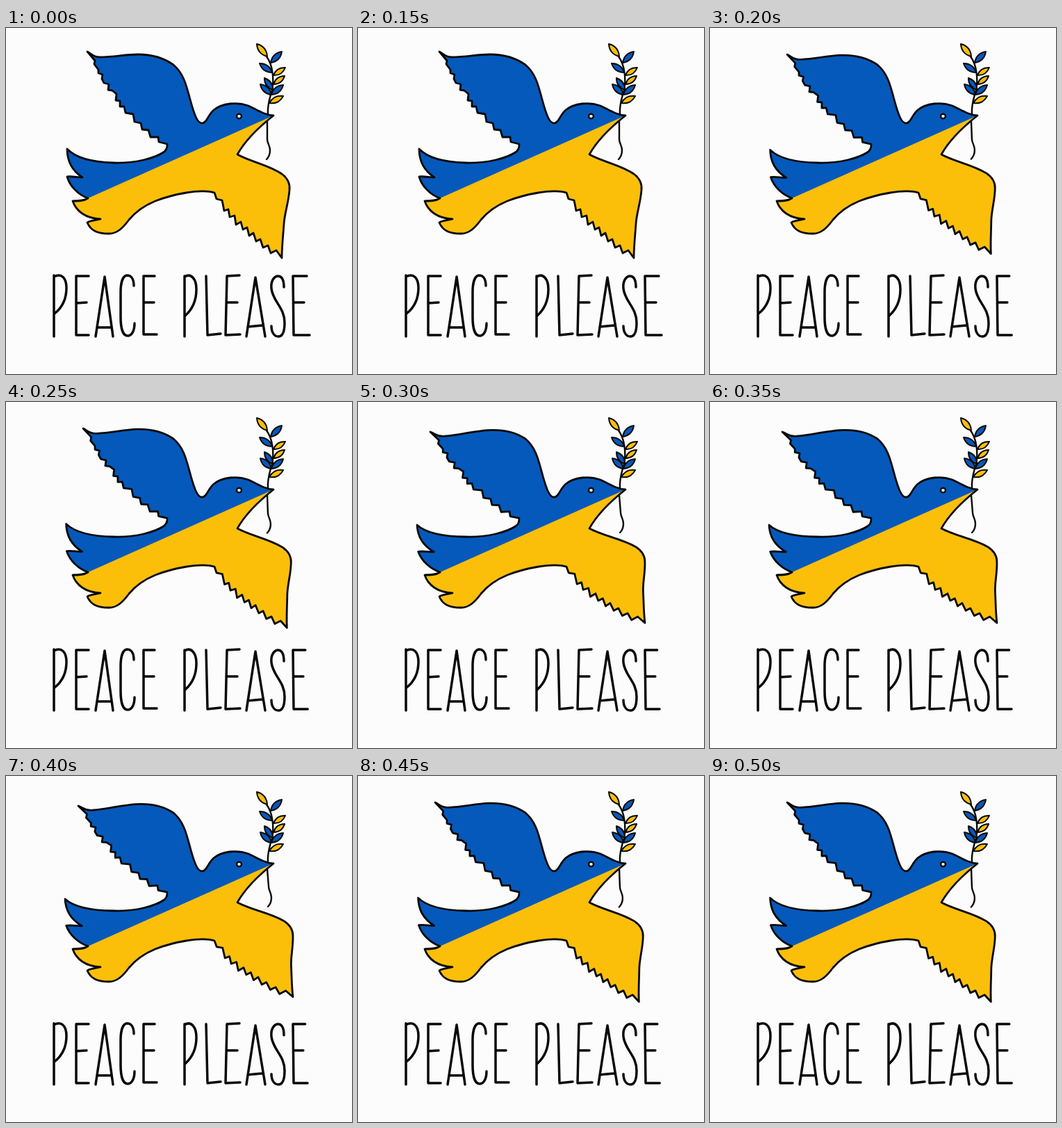
An HTML page for the animation above (0.55 s loop, 498 by 498 pixels).

```html
<!DOCTYPE html>
<html lang="en">
<head>
<meta charset="utf-8">
<title>Peace please</title>
<style>
  html, body { margin: 0; width: 100%; height: 100%; overflow: hidden; background: #fcfcfc; }
  svg { display: block; width: 100vw; height: 100vh; }
  .ink { fill: none; stroke: #080808; stroke-width: 2.8; stroke-linecap: round; stroke-linejoin: round; }
  .lettering { stroke-width: 3.5; }
  .blue { fill: #0559bb; }
  .yellow { fill: #fcbf09; }
</style>
</head>
<body>
<svg viewBox="0 0 498 498" role="img" aria-label="PEACE PLEASE">
  <defs><clipPath id="body"><path data-shape="dove"/></clipPath></defs>
  <g clip-path="url(#body)">
    <path class="yellow" d="M0 0H498V340H0Z"/>
    <path class="blue" d="M0 0H498V76L385 126L118 245H0Z"/>
  </g>
  <path class="ink" data-shape="dove"/>
  <ellipse class="ink" cx="335.5" cy="127" rx="3.5" ry="3.2" style="fill:#fcfcfc;stroke-width:2.4"/>
  <path class="ink" data-shape="stem" style="stroke-width:2.4"/>
  <g id="leaves"></g>
  <path class="ink lettering" data-shape="lettering"/>
</svg>
<script>
const shapes = {
  dove: `M117,34 C123,37 125,42 135,42 C155,42 172,38 190,38 C212,38 227,43 241,53
    C258,67 261,90 267,110 C271,123 275,137 282,137 C289,137 290,126 299,118
    C311,108 332,106 349,112 C362,118 371,125 385,126 C371,137 347,157 333,182
    C353,193 378,197 397,210 C405,216 409,223 408,233 C407,250 401,266 400,282 C399,298 397,314 397,331
    L389,320 L381,324 L377,313 L370,316 L366,304 L360,307 L356,295 L350,299 L347,287 L341,290
    L338,279 L331,283 L329,270 L322,272 L320,261 L314,263 L311,248 L303,246 L300,237
    C280,231 241,239 215,249 C198,256 187,264 177,276 C168,288 160,296 148,296
    C132,296 122,292 117,280 C121,277 129,277 136,275 C115,274 101,264 96,249
    C104,249 112,249 118,245 C104,240 92,228 88,214 C95,213 102,215 110,215
    C96,206 88,192 88,174 C100,187 124,193 155,194 C187,195 215,187 228,178 C232,174 232,171 232,167
    L220,164 L219,157 L208,157 L205,147 L196,146 L194,137 L185,135 L183,124 L172,122 L170,113
    L164,113 L164,105 L158,104 L159,95 L153,90 L147,89 L148,81 L141,79 L138,73 L139,67
    L133,65 L133,60 L127,52 L128,47 Z`,
  stem: `M375,41 C384,53 386,74 383,89 C380,101 376,109 377,124 M376,134
    L376,160 C376,166 380,169 380,176 C380,182 378,186 375,189`,
  lettering: `M69,356 L69,444 M69,358 C80,352 87,360 87,374 C87,391 80,403 70,411
    M119,357 L101,357 L101,442 L119,442 M101,396 L116,395
    M129,444 L142,358 L154,444 M132,431 L151,431
    M184,371 C184,361 180,356 174,356 C168,357 165,367 165,380 L165,416 C165,434 169,443 175,443 C181,443 185,436 185,425
    M214,357 L198,357 L198,441 L217,441 M198,395 L213,395
    M257,357 L257,444 M257,358 C267,352 274,362 274,376 C274,393 267,406 258,414
    M288,357 L290,442 L309,440
    M336,356 L318,357 L316,442 L337,441 M317,395 L333,395
    M346,444 L359,359 L373,444 M348,430 L369,428
    M400,373 C400,363 397,357 391,357 C385,358 381,365 382,375 C384,394 401,402 401,424
    C401,437 398,444 392,444 C386,444 382,438 382,429
    M433,357 L413,357 L414,442 L437,442 M414,395 L429,395`
};

// Leaf tip, leaf base, colour
const leaves = [
  [361, 23, 376, 41, "yellow"], [397, 34, 381, 50, "blue"],
  [365, 51, 383, 64, "blue"], [402, 57, 385, 68, "yellow"],
  [372, 72, 384, 89, "blue"], [401, 69, 385, 81, "yellow"],
  [366, 81, 382, 96, "blue"], [399, 82, 382, 96, "blue"],
  [399, 98, 379, 108, "yellow"]
];

document.getElementById("leaves").innerHTML = leaves.map(([x, y, bx, by, colour]) => {
  const mx = (x + bx) / 2, my = (y + by) / 2;
  const nx = (by - y) * .36, ny = (x - bx) * .36;
  return `<path class="ink ${colour}" style="stroke-width:2"
    d="M${x} ${y}Q${mx + nx} ${my + ny} ${bx} ${by}Q${mx - nx} ${my - ny} ${x} ${y}Z"/>`;
}).join("");

const clamp = v => Math.max(0, Math.min(1, v));

// Bends wings and tail; the head and trunk stay still.
function bend(x, y, lift) {
  if (y > 340) return [x - 3 * clamp((x - 425) / 10) * clamp(lift * 2), y];
  if (y < 170 && x < 240) {
    const w = clamp((235 - x) / 118) ** 1.3 * lift;
    return [x - 13 * w, y + 9 * w];
  }
  if (x < 140) {
    const w = clamp((140 - x) / 52) * clamp((245 - y) / 70) * lift;
    return [x - 3 * w, y + 3 * w];
  }
  if (x > 370 && y > 140 && y < 190) return [x + 2 * lift, y - lift];
  const w = clamp((x - 300) / 97) * clamp((y - 190) / 141) * lift;
  return [x + 16 * w, y - 13 * w];
}

function pose(lift) {
  for (const path of document.querySelectorAll("[data-shape]")) {
    path.setAttribute("d", shapes[path.dataset.shape].replace(/(\d+),(\d+)/g,
      (_, x, y) => bend(+x, +y, lift).map(v => v.toFixed(2)).join()));
  }
}

// Three held wing poses, up and back.
function liftAt(ms) {
  if (ms < 200) return 0;
  return ms >= 300 && ms < 450 ? 1 : .46;
}

let shown;
function tick() {
  const lift = liftAt(performance.now() % 550);
  if (lift !== shown) pose(shown = lift);
  requestAnimationFrame(tick);
}
tick();
</script>
</body>
</html>
```
